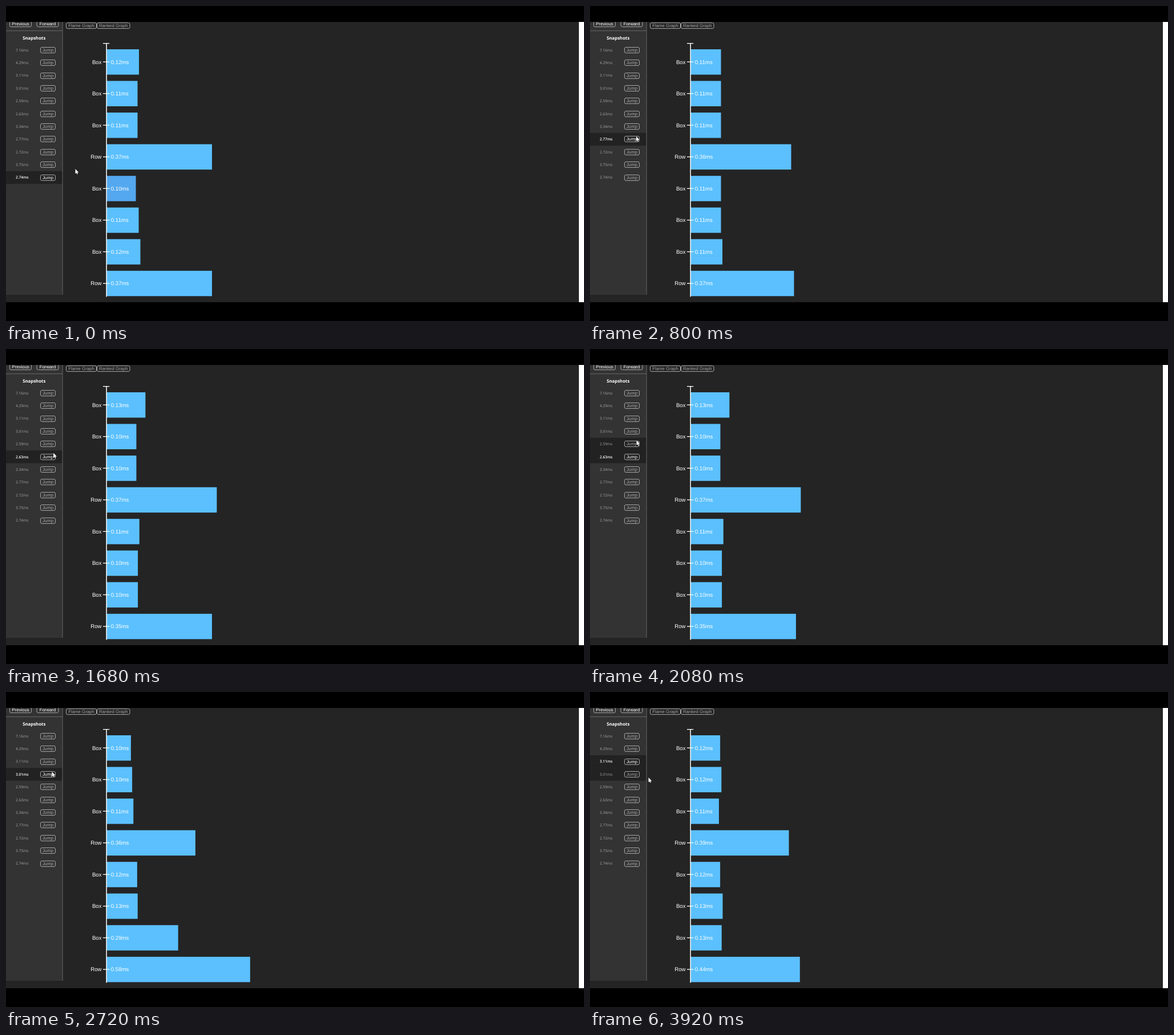
Recreate the animation shown at these times as an HTML page with a canvas. Size 1013x553 px, loop 4 s.

```html
<!DOCTYPE html>
<html lang="en">
<head>
<meta charset="utf-8">
<title>Snapshot profiler</title>
<style>
html, body { margin: 0; width: 100%; height: 100%; overflow: hidden; background: #000; }
canvas { display: block; width: 1013px; height: 553px; }
</style>
</head>
<body>
<canvas id="stage" width="1013" height="553"></canvas>
<script>
const ctx = document.getElementById('stage').getContext('2d');
const LOOP = 4000, STEP = 80;
const ARIAL = '"Liberation Sans", Arial, sans-serif';
const SANS = '"Open Sans", "Noto Sans", sans-serif';
const GRAY = '#a6a6a6', WHITE = '#fff', BACK = '#242424', DARK = '#222';
const BLUE = '#5bc0fd', BLUE_HOT = '#54a8ef';

const times = '7.16 4.29 3.11 3.01 2.59 2.63 3.34 2.77 2.72 3.75 2.74'.split(' ');

// The pointer reaches (x, y), then clicks to open the snapshot in that row.
// boxes: microseconds per box, own: extra cost of each row of three boxes, scale: px per microsecond.
const visits = [
  { click: 0, x: 121, y: 286, row: 10, scale: 0.496, boxes: [115, 110, 110, 104, 114, 120], own: [38, 35], hot: 4 },
  { reach: 560, click: 720, x: 80, y: 236, row: 7, scale: 0.496, boxes: [108, 108, 108, 108, 108, 113], own: [32, 37] },
  { reach: 1270, click: 1600, x: 83, y: 187, row: 5, scale: 0.53, boxes: [129, 99, 99, 109, 104, 104], own: [38, 32] },
  { reach: 2320, click: 2640, x: 80, y: 147, row: 3, scale: 0.438, boxes: [98, 103, 108, 123, 125, 287], own: [47, 40] },
  { reach: 2960, click: 3520, x: 80, y: 119, row: 2, scale: 0.438, boxes: [119, 124, 114, 119, 129, 125], own: [37, 65] },
  { reach: 3920, click: LOOP, x: 102, y: 150 }
];

const rowY = i => 77.4 + 22.37 * i;
const barY = i => 98.2 + 55.55 * i;

// Three boxes, then the row that contains them, twice.
function barsOf({ boxes, own }) {
  return own.flatMap((cost, i) => {
    const group = boxes.slice(3 * i, 3 * i + 3);
    return [...group, group.reduce((sum, us) => sum + us, cost)];
  });
}

function pointerAt(from, to, t) {
  const k = Math.min(1, (t - from.click) / (to.reach - from.click));
  return [from.x + (to.x - from.x) * k, from.y + (to.y - from.y) * k];
}

function rect(x, y, w, h, color) {
  ctx.fillStyle = color;
  ctx.fillRect(x, y, w, h);
}

function text(str, x, y, font, color, align = 'center') {
  ctx.font = font;
  ctx.fillStyle = color;
  ctx.textAlign = align;
  ctx.fillText(str, x, y);
}

function button(label, x, y, w, color, border = GRAY) {
  ctx.strokeStyle = border;
  ctx.lineWidth = 1;
  ctx.beginPath();
  ctx.roundRect(x, y - 5, w, 10, 2.5);
  ctx.stroke();
  text(label, x + w / 2, y + 2.8, '7.8px ' + ARIAL, color);
}

function drawSidebar(view, px, py) {
  rect(0, 28, 99, 479, '#333');
  button('Previous', 6.5, 31.5, 38, WHITE);
  button('Forward', 54, 31.5, 38, WHITE);
  rect(0, 43, 99, 1, '#666');
  text('Snapshots', 49.2, 58.6, 'bold 7.8px ' + SANS, WHITE);
  times.forEach((time, i) => {
    const y = rowY(i), dy = Math.abs(py - y);
    const selected = i === view.row;
    const over = px < 103 && dy < 11.18;
    const overButton = px > 60 && px < 87 && dy < 3.6;
    if (selected || over) rect(0, y - 11.2, 99, 22.4, DARK);
    text(time + 'ms', 28.2, y + 2.3, (selected ? '600 ' : '') + '6.6px ' + SANS, selected ? WHITE : GRAY);
    button('Jump', 60.5, Math.floor(y) + 0.5, 26, selected || overButton ? WHITE : GRAY, overButton ? WHITE : GRAY);
  });
  rect(98.6, 28, 1, 479, '#666');
}

function drawChart(view) {
  button('Flame Graph', 105.5, 34.5, 53, GRAY);
  button('Ranked Graph', 159.5, 34.5, 57.5, GRAY);
  const font = '9.7px ' + ARIAL;
  barsOf(view).forEach((us, i) => {
    const y = barY(i);
    rect(176, y - 22.2, us * view.scale, 44.5, i === view.hot ? BLUE_HOT : BLUE);
    rect(170, y - 0.7, 11.3, 1.3, WHITE);
    text(i % 4 === 3 ? 'Row' : 'Box', 167.6, y + 3.3, font, WHITE, 'right');
    text((Math.round(us / 10) / 100).toFixed(2) + 'ms', 183.7, y + 3.3, font, WHITE, 'left');
  });
  rect(175.4, 65, 1.5, 445.5, WHITE);
  rect(170, 65, 11.3, 1.3, WHITE);
}

function drawPointer(x, y) {
  ctx.save();
  ctx.translate(x, y);
  ctx.beginPath();
  [[0.5, 0], [0.5, 8.6], [2.4, 6.9], [3.7, 9.6], [5, 9], [3.8, 6.4], [6.4, 6.2]]
    .forEach(p => ctx.lineTo(...p));
  ctx.closePath();
  ctx.strokeStyle = '#111';
  ctx.lineWidth = 1;
  ctx.stroke();
  ctx.fillStyle = WHITE;
  ctx.fill();
  ctx.restore();
}

function draw(t) {
  const next = visits.findIndex(v => v.click > t);
  const view = visits[next - 1];
  const [px, py] = pointerAt(view, visits[next], t);
  rect(0, 0, 1013, 553, BACK);
  drawSidebar(view, px, py);
  drawChart(view);
  rect(1004, 28, 9, 492, WHITE);
  rect(0, 0, 1013, 28, '#000');
  rect(0, 520, 1013, 33, '#000');
  drawPointer(px, py);
}

ctx.fontKerning = 'normal';
ctx.textRendering = 'geometricPrecision';
const start = performance.now();
function tick() {
  const t = Math.max(0, performance.now() - start) % LOOP;
  draw(Math.floor(t / STEP) * STEP);
  requestAnimationFrame(tick);
}
tick();
</script>
</body>
</html>
```
